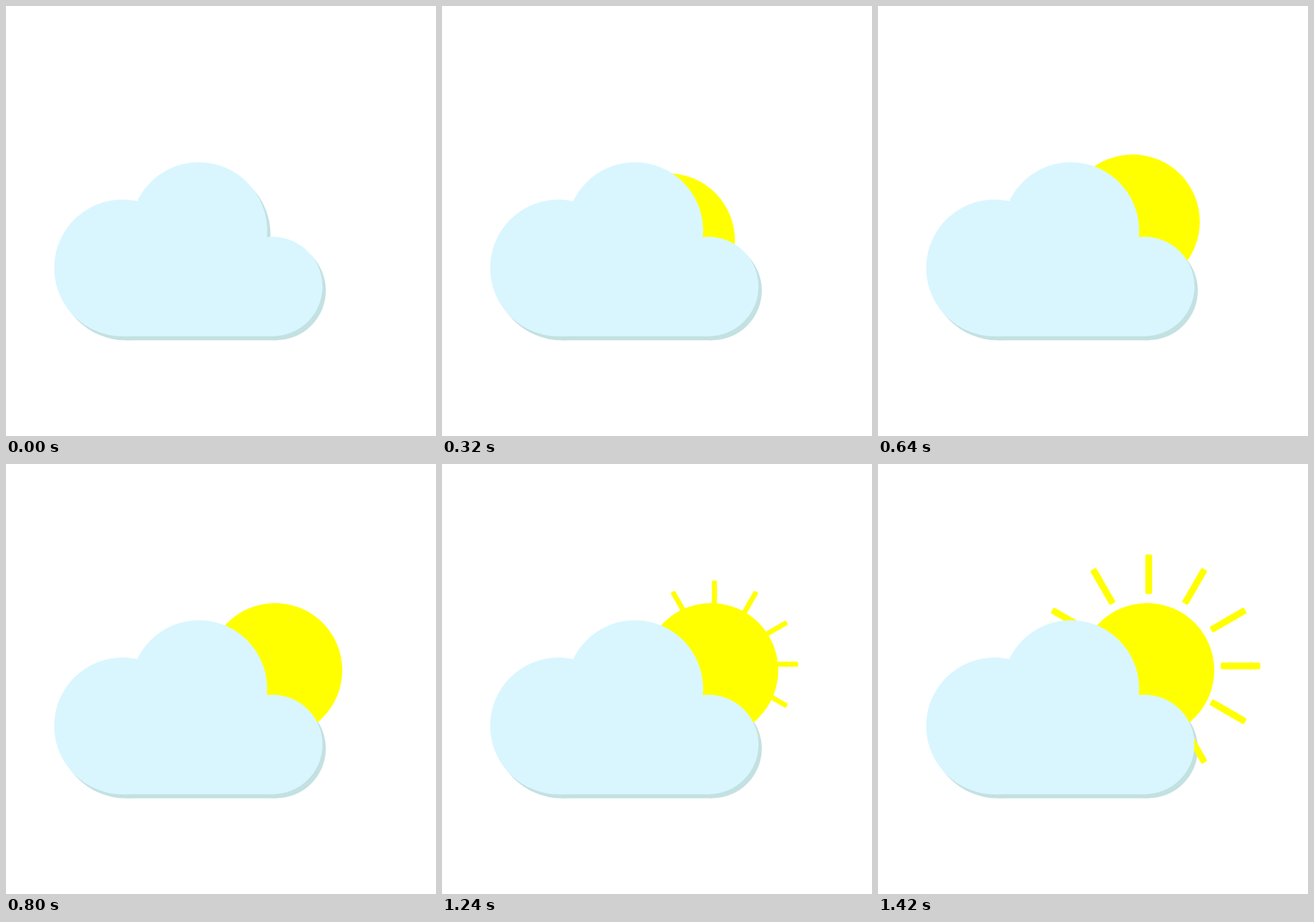
An HTML page that plays this animation: 640x640 px, repeating every 3.02 s.

```html
<!DOCTYPE html>
<html lang="en">
<head>
<meta charset="utf-8">
<title>Sun behind a cloud</title>
<style>
  html, body { margin: 0; height: 100%; overflow: hidden; background: #fff; }
  svg { display: block; width: 100%; height: 100%; }
</style>
</head>
<body>
<svg viewBox="0 0 640 640">
  <defs>
    <g id="cloud">
      <circle cx="173.5" cy="389.8" r="101.8"/>
      <circle cx="287" cy="334.3" r="101.7"/>
      <circle cx="397" cy="417.5" r="74"/>
      <rect x="173.5" y="389" width="223.5" height="102.5"/>
    </g>
    <rect id="ray" x="107" y="-5" width="59" height="10" rx="2.5"/>
  </defs>
  <use href="#cloud" x="5" y="6" fill="#c4e1e2"/>
  <g fill="#ff0">
    <circle id="sun" r="100"/>
    <g id="rays"></g>
  </g>
  <use href="#cloud" fill="#d9f6ff"/>
</svg>
<script>
  const LOOP = 3020, STEP = 20;
  const sun = document.getElementById('sun');
  const rays = document.getElementById('rays');

  for (let angle = 0; angle < 360; angle += 30) {
    const ray = document.createElementNS('http://www.w3.org/2000/svg', 'use');
    ray.setAttribute('href', '#ray');
    ray.setAttribute('transform', `rotate(${angle})`);
    rays.append(ray);
  }

  const progress = (t, start, end) => Math.min(1, Math.max(0, (t - start) / (end - start)));
  const mix = (a, b, p) => a + (b - a) * p;

  function draw(now) {
    const t = Math.floor((now % LOOP) / STEP) * STEP;

    const rise = progress(t, 0, 800);
    sun.setAttribute('cx', mix(293, 400.5, rise));
    sun.setAttribute('cy', mix(377, 307, rise));

    const grow = progress(t, 1060, 1420);
    const x = mix(408, 403, grow), y = mix(295.5, 300.5, grow);
    rays.setAttribute('transform', `translate(${x} ${y}) scale(${mix(0.5, 1, grow)})`);
    rays.setAttribute('visibility', grow > 0 ? 'visible' : 'hidden');

    requestAnimationFrame(draw);
  }
  draw(0);
</script>
</body>
</html>
```
